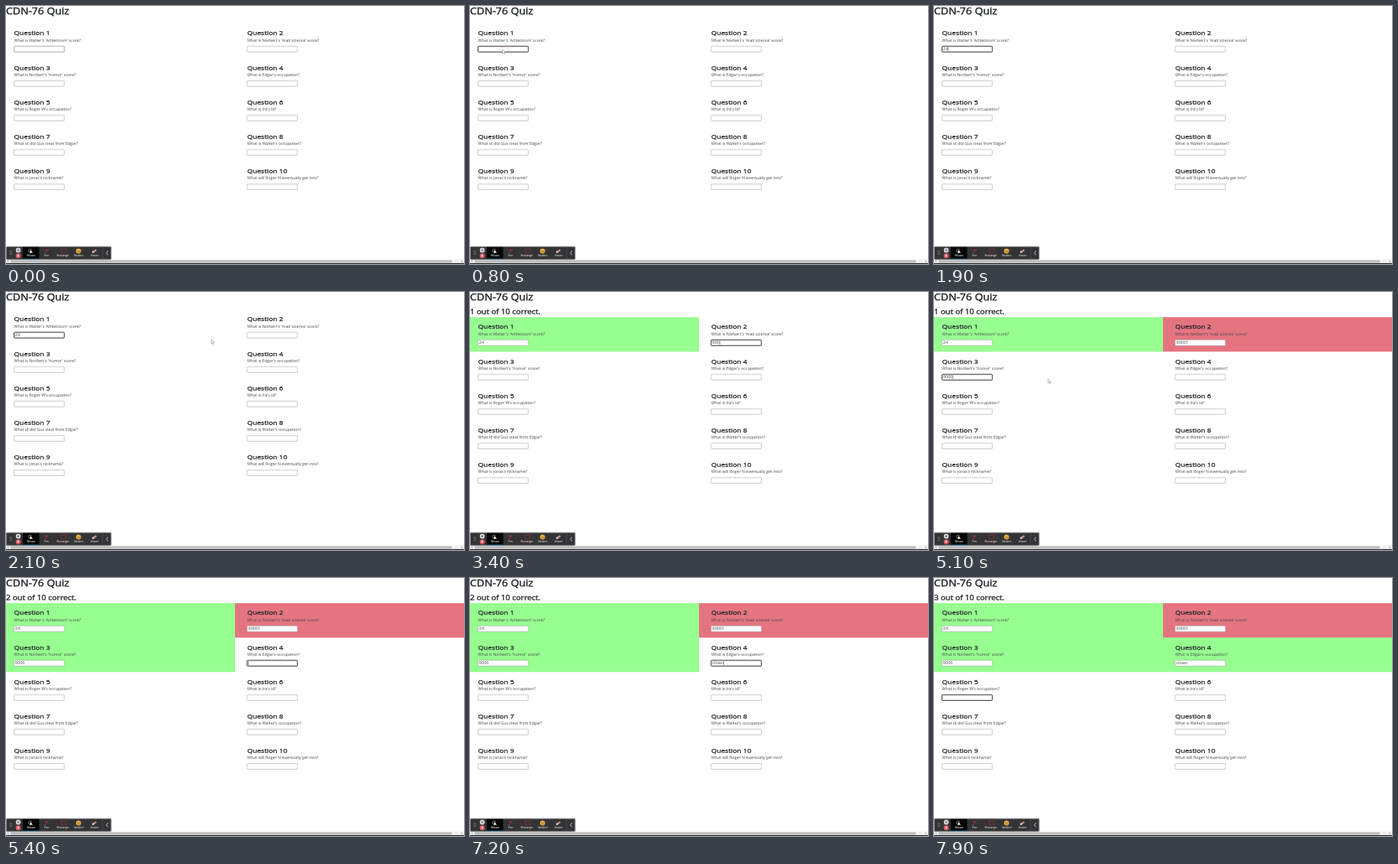
Animation of 600x338 px, one loop 8000 ms. Source, as an HTML page:

```html
<!DOCTYPE html>
<html lang="en">
<head>
<meta charset="utf-8">
<title>Quiz</title>
<style>
  html, body { margin: 0; width: 100%; height: 100%; overflow: hidden; background: #fff; }
  svg { display: block; width: 600px; height: 338px; }
  text { font-family: "Open Sans", "Noto Sans", sans-serif; fill: #45484c; white-space: pre; }
  .head { font-weight: 500; fill: #25282c; stroke: #25282c; stroke-width: .036em; }
  .label { font-weight: 600; fill: #ddd; }
</style>
</head>
<body>
<svg id="stage" viewBox="0 0 600 338"></svg>
<script>
const LOOP = 8000, WIDEN = 1.16, BLINK = 200, ROW = 45.1;
const GREEN = '#97ff90', RED = '#e57480';
const stage = document.getElementById('stage');

function add(parent, tag, attrs = {}, content) {
  const el = document.createElementNS('http://www.w3.org/2000/svg', tag);
  for (const k in attrs) el.setAttribute(k, attrs[k]);
  if (content !== undefined) el.textContent = content;
  parent.append(el);
  return el;
}
const rect = (p, x, y, width, height, fill, rx = 0) =>
  add(p, 'rect', { x, y, width, height, fill, rx });
const path = (p, d, stroke, width) =>
  add(p, 'path', { d, stroke, 'stroke-width': width, fill: 'none' });
// The whole page was squeezed vertically, so all type is equally wide.
const text = (p, x, y, size, content, cls = '') =>
  add(p, 'text', { transform: `translate(${x} ${y}) scale(${WIDEN} 1)`, 'font-size': size, class: cls }, content);
const show = (el, on) => el.setAttribute('visibility', on ? 'visible' : 'hidden');

const questions = [
  "What is Walter's 'Athleticism' score?",
  "What is Norbert's 'mad science' score?",
  "What is Norbert's 'humor' score?",
  "What is Edgar's occupation?",
  "What is Roger W's occupation?",
  "What is Ira's id?",
  "What id did Gus steal from Edgar?",
  "What is Walter's occupation?",
  "What is Jonas's nickname?",
  "What will Roger N eventually get into?"
];

// time, question
const focuses = [[600, 0], [2200, 1], [4050, 2], [5400, 3], [7300, 4]];
// time, question, value
const keys = [
  [1100, 0, '2'], [1500, 0, '24'],
  [2800, 1, '9'], [2900, 1, '90'], [3000, 1, '900'], [3500, 1, '9000'], [3650, 1, '90001'],
  [4700, 2, '9'], [4800, 2, '90'], [4900, 2, '900'], [5000, 2, '9000'],
  [6000, 3, 'c'], [6200, 3, 'cl'], [6400, 3, 'clo'], [6600, 3, 'clow'], [6800, 3, 'clown']
];
// time, question, fill, score
const grades = [[2200, 0, GREEN, 1], [3950, 1, RED, 1], [5400, 2, GREEN, 2], [7300, 3, GREEN, 3]];
// time, x, y
const moves = [
  [[100, 60, 330], [400, 98, 200], [700, 45, 57], [1000, 38, 57]],
  [[1300, 38, 57], [1550, 145, 57]],
  [[1950, 145, 57], [2250, 350, 66]],
  [[3500, 350, 66], [3950, 55, 108]],
  [[5000, 60, 112], [5280, 284, 117]],
  [[5450, 295, 116], [5750, 352, 112]],
  [[6000, 355, 112], [6800, 42, 96], [7100, 45, 172]]
];
const clicks = [[600, 45, 57], [2200, 350, 67], [3950, 55, 108], [5450, 340, 111], [7300, 45, 156]];

text(stage, 0, 10.6, 12, 'CDN-76 Quiz', 'head');
const score = text(stage, 0, 29.4, 9.06, '', 'head');
const board = add(stage, 'g');

const cells = questions.map((q, i) => {
  const right = i % 2, x = right ? 316 : 10.6;
  const g = add(board, 'g', { transform: `translate(0 ${(i >> 1) * ROW})` });
  const back = rect(g, right * 300, 33, 300, ROW, 'none');
  text(g, x, 48.4, 8, `Question ${i + 1}`, 'head');
  text(g, x, 56.7, 4.6, q);
  const box = add(g, 'rect', { x: x - .1, y: 62.8, width: 65.8, height: 7.4, rx: .7, fill: '#fff' });
  const value = text(g, x + 1.2, 68.2, 4.8, '');
  const caret = rect(g, 0, 64, .5, 5.2, '#333');
  return { x, back, box, value, caret };
});

function drawChrome() {
  rect(stage, 0, 332, 600, 5, '#f1f1f1');
  rect(stage, 6, 333, 578, 3.4, '#c1c1c1');
  path(stage, 'M3.4 333.6L2 334.7L3.4 335.8M596.6 333.6L598 334.7L596.6 335.8', '#777', .7);
  rect(stage, 0, 336.9, 600, 1.1, '#222');

  add(stage, 'rect', { x: .4, y: 315.2, width: 137.4, height: 16.9, rx: 1.3, fill: '#343436', stroke: '#8c8c8e', 'stroke-width': 1 });
  for (let i = 0; i < 6; i++) rect(stage, 5 + i % 2 * 1.8, 321 + (i >> 1) * 2, .9, .9, '#aaa');
  add(stage, 'circle', { cx: 16, cy: 320, r: 3.2, fill: '#d5d5d5' });
  path(stage, 'M14.8 318.8l2.4 2.4m0 -2.4l-2.4 2.4', '#444', .7);
  add(stage, 'circle', { cx: 16, cy: 327.2, r: 3.2, fill: '#dd5a6a' });
  rect(stage, 15, 326.2, 2, 2, '#f6dde0');
  rect(stage, 22, 315.8, 21.5, 15.8, '#060606');
  rect(stage, 22, 330.8, 21.5, .8, '#2b7fae');
  path(stage, 'M126.6 316.5v14.5', '#5a5a5c', .6);

  add(stage, 'circle', { cx: 31.5, cy: 320.5, r: 2.2, fill: 'none', stroke: '#ccc', 'stroke-width': .5 });
  add(stage, 'path', { d: 'M31.5 319.5v5l1.3 -1.2l2.5 .2z', fill: '#fff' });
  path(stage, 'M51 324l1 -2l4 -3M51 319.5h3', '#b5334a', 1);
  add(stage, 'rect', { x: 72.5, y: 318.4, width: 6.4, height: 5.2, fill: 'none', stroke: '#8f2b40', 'stroke-width': .8 });
  add(stage, 'circle', { cx: 95, cy: 321, r: 3.3, fill: '#eaae45' });
  path(stage, 'M93.5 320h.7m1.6 0h.7M93.3 321.7q1.7 2 3.4 0', '#6b3b16', .7);
  path(stage, 'M113.5 322.8l4.8 -3.3', '#c98a92', 2.3);
  path(stage, 'M113.2 323l1.6 -1.1', '#ddd', 2.3);
  path(stage, 'M133.7 321l-2.4 2.6l2.4 2.6', '#e4e4e4', .9);
  [[27.6, 'Mouse'], [50.3, 'Pen'], [66.6, 'Rectangle'], [89, 'Stickers'], [111.3, 'Eraser']]
    .forEach(([x, name]) => text(stage, x, 328.4, 2.9, name, 'label'));
}
drawChrome();

const ring = add(stage, 'ellipse', { fill: 'none', stroke: '#d0606c', 'stroke-width': .5 });
const mouse = add(stage, 'path', { d: 'M0 0v5.2l1.3 -1.1l1 2l.9 -.4l-.9 -1.9h1.8z', fill: '#fff', stroke: '#777', 'stroke-width': .5 });

const last = (list, t) => list.filter(e => e[0] <= t).pop();

function mouseAt(t) {
  for (const run of moves)
    for (let i = 1; i < run.length; i++) {
      const [t0, x0, y0] = run[i - 1], [t1, x1, y1] = run[i];
      if (t < t0 || t >= t1) continue;
      const k = (t - t0) / (t1 - t0), e = k * k * (3 - 2 * k);
      return [x0 + (x1 - x0) * e, y0 + (y1 - y0) * e];
    }
  return null;
}

function render(t) {
  const focus = last(focuses, t), graded = last(grades, t);
  board.setAttribute('transform', `translate(0 ${graded ? 0 : -10})`);
  score.textContent = graded ? `${graded[3]} out of 10 correct.` : '';

  cells.forEach((c, i) => {
    const own = e => e[1] === i;
    const grade = last(grades.filter(own), t), key = last(keys.filter(own), t);
    const active = !!focus && focus[1] === i;
    c.back.setAttribute('fill', grade ? grade[2] : 'none');
    c.value.textContent = key ? key[2] : '';
    c.box.setAttribute('stroke', active ? '#2c2c32' : !focus && i === 0 ? '#707070' : '#a4a4a4');
    c.box.setAttribute('stroke-width', active ? 1 : .6);
    const since = t - Math.max(active ? focus[0] : 0, key ? key[0] : 0);
    const on = active && Math.floor(since / BLINK) % 2 === 0;
    show(c.caret, on);
    if (on) c.caret.setAttribute('x', c.x + 1.4 + (key ? c.value.getComputedTextLength() * WIDEN : 0));
  });

  const at = mouseAt(t);
  show(mouse, at);
  if (at) mouse.setAttribute('transform', `translate(${at[0]} ${at[1]})`);

  const click = last(clicks, t), age = click ? (t - click[0]) / 230 : 1;
  show(ring, age < 1);
  if (age < 1) {
    const [, cx, cy] = click, r = 1.5 + 3.5 * age;
    const shape = { cx, cy, rx: r * WIDEN, ry: r * .85, opacity: 1 - age * .5 };
    for (const k in shape) ring.setAttribute(k, shape[k]);
  }
}

function tick() {
  render((performance.now() + 20) % LOOP);
  requestAnimationFrame(tick);
}
tick();
</script>
</body>
</html>
```
